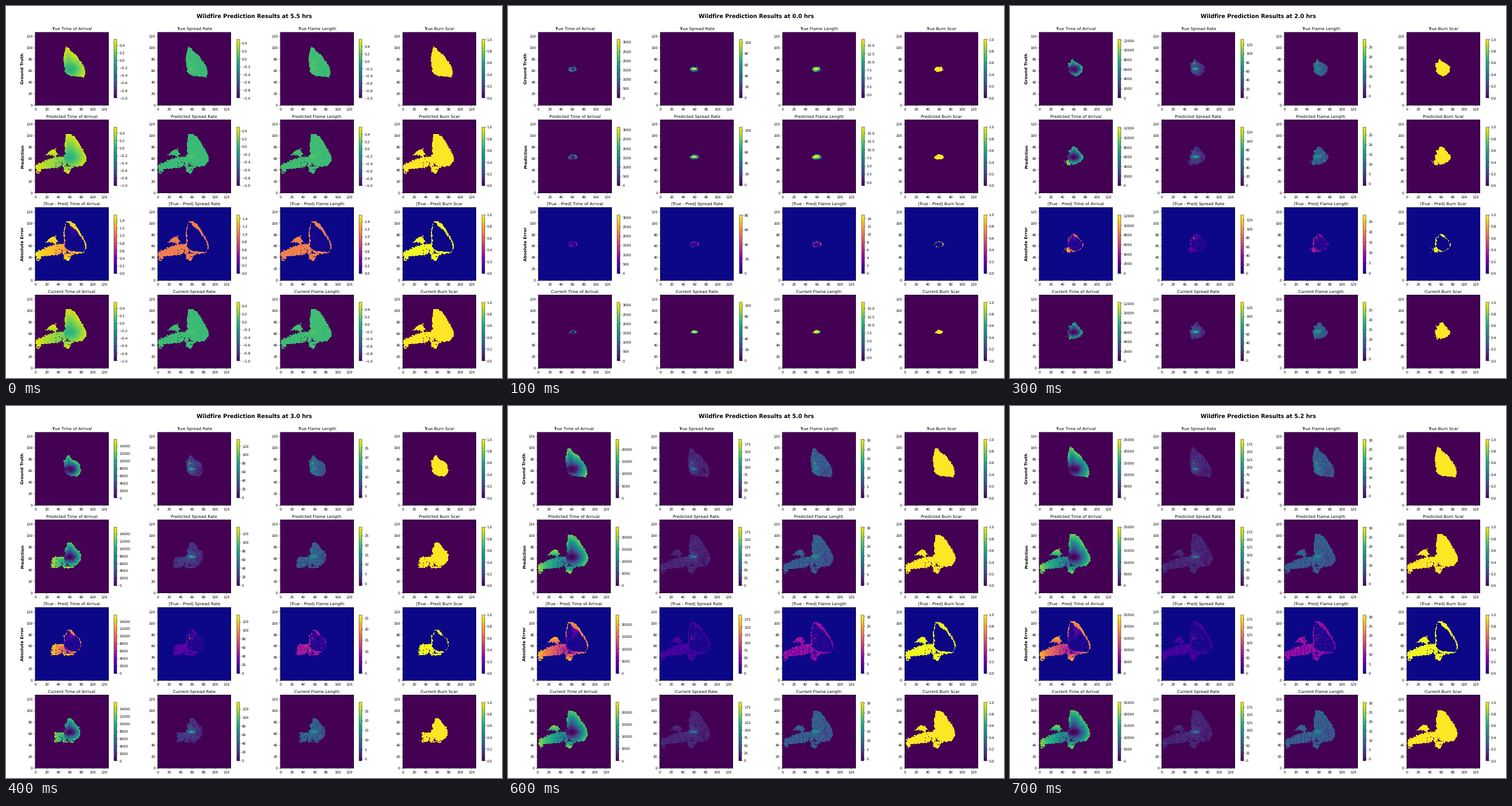
A matplotlib script for the animation above (0.8 s loop, 864 by 648 pixels).

```python
import numpy as np
import matplotlib.pyplot as plt
from matplotlib.animation import FuncAnimation
from matplotlib.path import Path

W, H, N = 864, 648, 128
SIDE, PITCH, BOTTOM = 127.6, 152.65, 173.1
HOURS = [5.5, 0.0, 1.0, 2.0, 3.0, 4.0, 5.0, 5.2]
LAST = 5.2
ROWS = ["True", "Predicted", "|True - Pred|", "Current"]
ROW_LABELS = ["Ground Truth", "Prediction", "Absolute Error", ""]
COLUMNS = ["Time of Arrival", "Spread Rate", "Flame Length", "Burn Scar"]

# Final fire outlines, in cells
TRUE_EDGE = [(53, 102), (58, 98), (64, 91), (70, 87), (75, 79), (82, 71), (86, 59),
             (84, 48.5), (72, 50), (60, 52), (53, 57), (51, 64), (49, 75), (50, 90)]
PRED_EDGE = [(53, 102), (62, 102), (68, 97), (74, 89), (79, 79), (86, 69), (89, 60),
             (87, 53), (80, 48), (70, 46), (60, 48), (54, 52), (52, 68), (51, 82)]
WEST_LOBES = [
    [(1, 34), (0, 49), (12, 54), (28, 61), (40, 63), (50, 62), (54, 48), (40, 44),
     (26, 42), (9, 41), (5, 34)],
    [(14, 65), (24, 73), (35, 76), (39, 68), (34, 62), (27, 66)],
    [(42, 47), (50, 43), (49, 36), (56, 33), (60, 40), (69, 46)],
]

rng = np.random.default_rng(7)
Y, X = np.mgrid[0:N, 0:N].astype(float)
CX, CY = 59, 62.5
DIST = np.hypot(X - CX, Y - CY)
ANGLE = np.arctan2(Y - CY, X - CX)


def noise(passes=1):
    """Unit-variance noise, softened over neighbouring cells."""
    n = rng.normal(size=(N, N))
    for _ in range(passes):
        n = sum(np.roll(n, (i, j), (0, 1)) for i in (-1, 0, 1) for j in (-1, 0, 1))
    return n / n.std()


def bump(x, y, sx, sy):
    return np.exp(-((X - x) / sx) ** 2 - ((Y - y) / sy) ** 2)


def edge_radius(points):
    """Distance from the ignition point to the outline, in every cell's direction."""
    p = np.array(points, float) - (CX, CY)
    theta = np.arctan2(p[:, 1], p[:, 0])
    inverse = 1 / np.hypot(*p.T)
    return 1 / np.interp(ANGLE, theta, inverse, period=2 * np.pi)


def arrival_time(points):
    """Hour at which each cell burns: steady growth until the outline is reached."""
    edge = edge_radius(points) + 0.3
    start = 1 / np.hypot(np.cos(ANGLE) / 7.5, np.sin(ANGLE) / 4.5)
    start = np.minimum(start, edge)
    speed = np.maximum((edge - start) / LAST, 4.3)
    r = DIST + 0.6 * noise()
    hour = np.where(r < start, r / start - 1, (r - start) / speed)
    return np.where(r <= edge, np.minimum(hour, LAST), np.inf)


def west_arrival():
    """The lobe creeps west and away from its axis at the same time."""
    wobble = np.stack([noise(), noise()], -1)
    cells = (np.stack([X, Y], -1) + wobble).reshape(-1, 2)
    inside = np.any([Path(p).contains_points(cells) for p in WEST_LOBES], 0)
    by_x = np.interp(X, [0, 10, 54], [5.1, 4.0, 1.5])
    by_y = np.interp(Y, [33, 50, 56, 76], [5.1, 1.6, 1.9, 5.1])
    hour = np.maximum(by_x, by_y) + 0.08 * noise()
    return np.where(inside.reshape(N, N), hour, np.inf)


def make_fire(edge, west=None, hot_spots=False):
    hour = arrival_time(edge)
    seconds = 1200 + np.where(hour < 0, 1200, 3600) * hour
    if west is not None:
        seconds = np.where(west < hour, 3000 + 3600 * west, seconds)
        hour = np.minimum(hour, west)
        seam = (X > 32) & (X < 64) & (Y > 40) & (Y < 64) & (hour > 1.4)
        hour[seam & (noise() > 1.5)] = np.inf
    seconds = np.clip(seconds, 100, 21500) + 250 * noise()
    core = bump(59, 63, 5, 1.6)
    halo = bump(56, 64, 9, 9)
    calm = bump(76, 58, 9, 14)
    spread = 19 + 55 * core + 18 * halo - 6 * calm + 4 * noise()
    flame = 8.3 + 5.5 * core + 1.5 * halo - 2 * calm + 1.1 * noise()
    if hot_spots:
        spots = (noise(0) > 1.1) * bump(57, 74, 4, 6)
        spread = spread + 110 * spots
        flame = flame + 16 * spots
    return hour, np.maximum(seconds, 0), np.maximum(spread, 3), np.maximum(flame, 1)


TRUE_FIRE = make_fire(TRUE_EDGE, hot_spots=True)
PRED_FIRE = make_fire(PRED_EDGE, west_arrival())


def snapshot(fire, hour, normalised):
    """The four maps of a fire at an hour; unburnt cells hold -1 (scar: 0)."""
    arrival, seconds, spread, flame = fire
    burnt = arrival <= hour
    if normalised:
        maps = [seconds / 42000, spread / 900, flame / 80]
    else:
        # A young fire burns hotter at its core
        young = 1 + 0.45 * max(0, 1 - hour / 2) * bump(58, 63, 8, 4)
        maps = [seconds, spread * young, flame * young ** 0.6]
    return [np.where(burnt, m, -1) for m in maps] + [burnt.astype(float)]


def field_limits(hour, normalised):
    """Upper colour limits of the first three columns."""
    if normalised:
        return [0.557, 0.498, 0.598]
    return [np.interp(hour, [0, 2, 4, LAST], [3150, 12240, 19350, 25030]),
            np.interp(hour, [1, 2, 4, 5], [106, 132, 140, 191]),
            np.interp(hour, [0, 2, 5], [16.9, 29, 30.4])]


def error_limits(hour, normalised):
    arrival, spread, flame = field_limits(hour, normalised)
    if normalised:
        return [arrival + 1, spread + 1, flame + 1]
    return [arrival, spread - 25 * max(0, 1 - hour / 2),
            np.interp(hour, [0, 1, 2, 4, 5], [15, 24, 28.2, 24.9, 31.1])]


plt.rcParams.update({"font.family": "DejaVu Sans", "text.hinting": "none"})
fig = plt.figure(figsize=(20, 15), dpi=43.2, facecolor="white")
heading = fig.suptitle("", fontsize=16, fontweight="bold")


def box(x, bottom, w, h):
    return [x / W, 1 - bottom / H, w / W, h / H]


def panel_boxes(row, col, first_left):
    # The last column stays put while the first one makes room for its labels
    left = first_left + (691.1 - first_left) * col / 3
    bottom = BOTTOM + row * PITCH
    return (box(left, bottom, SIDE, SIDE),
            box(left + 137.4, bottom - 0.1 * SIDE, 0.04 * SIDE, 0.8 * SIDE))


def make_panel(row, col):
    main, side = panel_boxes(row, col, 51)
    ax, cax = fig.add_axes(main), fig.add_axes(side)
    image = ax.imshow(np.zeros((N, N)), origin="lower", aspect="auto",
                      vmin=0, vmax=1, cmap="plasma" if row == 2 else "viridis")
    ax.set_xticks(range(0, N, 20))
    ax.set_yticks(range(0, N, 20))
    ax.set_title(f"{ROWS[row]} {COLUMNS[col]}", fontsize=12)
    for spine in ax.spines.values():
        spine.set_snap(False)
    if col == 0:
        ax.set_ylabel(ROW_LABELS[row], fontsize=12, fontweight="bold")
    fig.colorbar(image, cax=cax)
    return ax, cax, image


panels = [[make_panel(r, c) for c in range(4)] for r in range(4)]


def draw(i):
    hour, normalised = HOURS[i], i == 0
    heading.set_text(f"Wildfire Prediction Results at {hour:.1f} hrs")
    first_left = 52.5 if hour < 2 else 50.7
    true = snapshot(TRUE_FIRE, hour, normalised)
    pred = snapshot(PRED_FIRE, hour, normalised)
    current = snapshot(PRED_FIRE, hour - 0.25, normalised)
    error = [np.abs(a - b) for a, b in zip(true, pred)]
    for row, maps in enumerate((true, pred, error, current)):
        is_error = row == 2
        limits = (error_limits if is_error else field_limits)(hour, normalised)
        for col, (ax, cax, image) in enumerate(panels[row]):
            main, side = panel_boxes(row, col, first_left)
            ax.set_position(main)
            cax.set_position(side)
            image.set_data(maps[col])
            if col < 3:
                image.set_clim(0 if is_error else -1, limits[col])
    return []


anim = FuncAnimation(fig, draw, frames=len(HOURS), interval=100, repeat=True)
plt.show()
```
